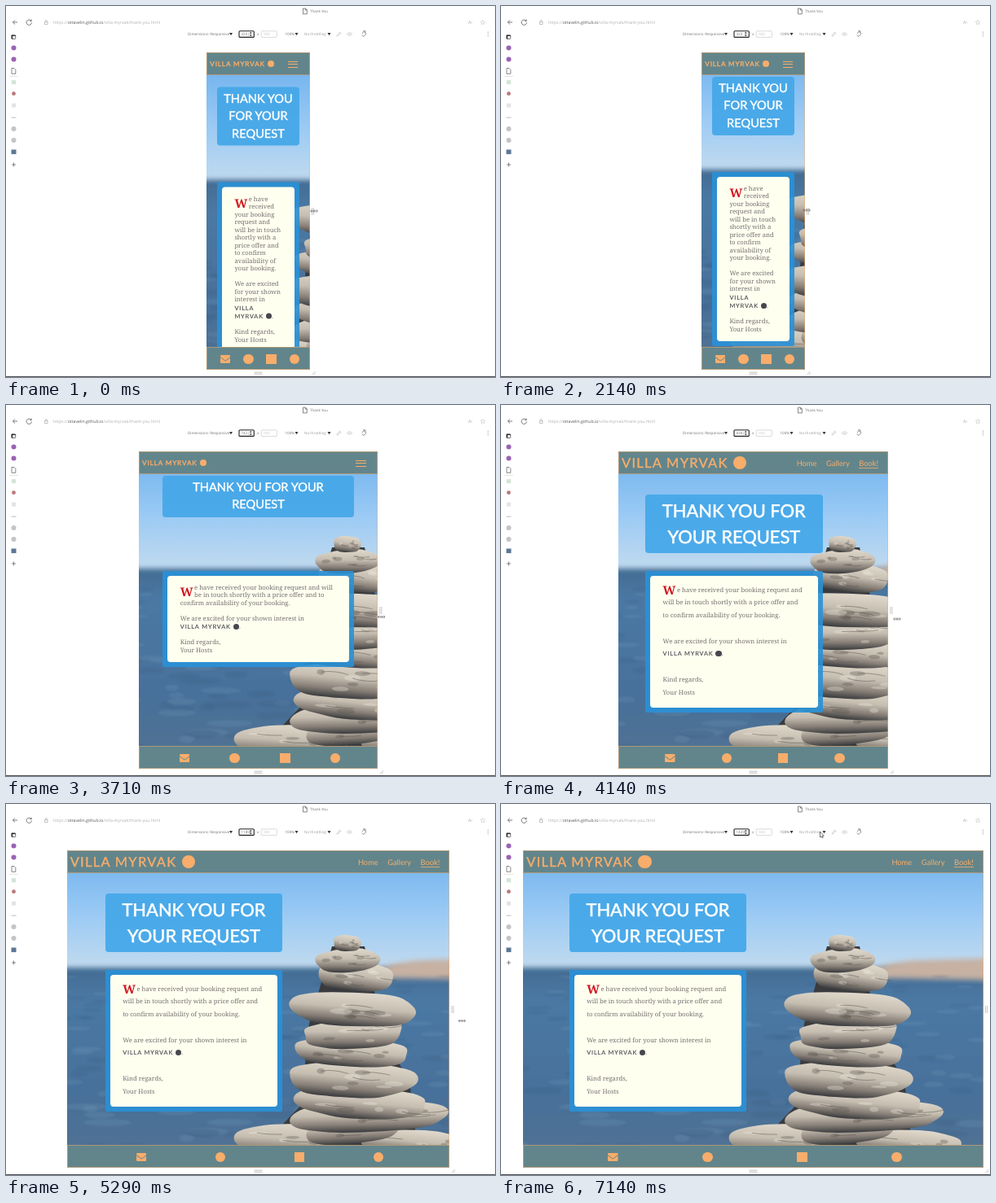
Animation of 600x456 px, one loop 7280 ms. Source, as an HTML page:

```html
<!DOCTYPE html>
<html lang="en">
<head>
<meta charset="utf-8">
<title>Thank You</title>
<style>
html, body { margin: 0; width: 100%; height: 100%; overflow: hidden; background: #fff; }
body { position: relative; text-rendering: geometricPrecision; font-family: Lato, sans-serif; }
svg { display: block; }
#ui, #over { position: absolute; left: 0; top: 0; }
#ui text { font: 4.5px "Open Sans", "Noto Sans", sans-serif; fill: #707070; }
#ui .url { font-size: 5.2px; fill: #b0b0b0; }
#page { position: absolute; top: 57px; height: 390px; overflow: hidden; background: #62858b; --line: rgba(248,173,107,.5); }
header, footer { position: absolute; left: 0; right: 0; height: 28px; color: #f8ad6b; box-shadow: inset 0 0 0 1px var(--line); }
header { top: 0; }
footer { bottom: 0; }
.brand { position: absolute; left: 4px; top: 0; line-height: 29px; font-size: 16.5px; letter-spacing: 1.25px; white-space: nowrap; -webkit-text-stroke: .35px; }
.dot { display: inline-block; width: 1em; height: 1em; border-radius: 50%; background: currentColor; vertical-align: -.13em; }
.brand .dot { margin-left: .05em; }
nav { position: absolute; right: 12px; top: 9px; display: flex; gap: 11.5px; font-size: 9.3px; line-height: 12px; }
nav b { height: 11px; font-weight: 400; border-bottom: 1px solid rgba(248,173,107,.8); }
.menu { position: absolute; right: 14.5px; top: 11px; width: 12.5px; height: 5.5px; border: solid; border-width: 1px 0; display: none; }
.menu::after { content: ""; display: block; margin-top: 2.3px; height: 1px; background: currentColor; }
#view { position: absolute; top: 28px; left: 0; right: 0; height: 334px; overflow: hidden; }
#view::after { content: ""; position: absolute; inset: 0; border-right: 1px solid var(--line); }
#scroll { position: absolute; inset: 0; }
#photo { position: absolute; left: calc(50% - 309.5px); top: -85px; }
h1, .card { position: absolute; left: 10%; width: 217.5px; box-sizing: border-box; margin: 0; border-radius: 4px; }
h1 { top: 24.5px; padding: 4px; font: 400 21.9px/32px Lato, sans-serif; -webkit-text-stroke: .55px; color: #fff; text-align: center; background: rgba(70,168,232,.95); }
.card { top: 119px; padding: 6px; background: rgba(42,146,216,.9); border-radius: 2px; }
.card div { padding: 10.5px 15.5px 9px; border-radius: 4px; background: #fffff0; color: #75706f; font: 7.7px/15.8px "Noto Serif", serif; white-space: nowrap; }
p { margin: 0 0 15.8px; }
p:last-child { margin: 0; }
.cap { float: left; margin-right: 1.5px; font: 700 14.8px/15px "Noto Serif", serif; color: #d3141f; }
.name { font: 7.4px Lato, sans-serif; letter-spacing: .85px; color: #46474c; -webkit-text-stroke: .12px; }
.icons { position: absolute; top: 0; left: calc(10% - 4px); width: calc(80% + 12px); height: 30px; display: flex; justify-content: space-around; align-items: center; }
.icons i { width: 12.5px; height: 12.5px; background: #f8ad6b; border-radius: 50%; }
.icons .sq { border-radius: 0; }
.small .brand { font-size: 8.2px; letter-spacing: .85px; }
.small nav, .small .wide { display: none; }
.small .menu { display: block; }
.small h1 { top: 2px; width: 80%; font-size: 14.6px; line-height: 21.3px; -webkit-text-stroke-width: .4px; }
.small .card { width: 80%; }
.small .card div { line-height: 9.5px; white-space: normal; }
.small p { margin-bottom: 9.5px; }
.small p:last-child { margin: 0; }
.small .cap { margin-top: 2px; }
.small .name { line-height: 9px; }
</style>
</head>
<body>
<svg id="ui" width="600" height="456" fill="none" stroke="#666" stroke-width=".7">
  <path d="M364.5 3h3l1.8 1.8v5h-4.8z M367.3 3v2h2 M7 76.5h3l1.8 1.8v5H7z M9.5 192.5v5M7 195h5" stroke="#555"/>
  <path d="M14 20H8.5m2.5-2.6L8.4 20l2.6 2.6 M30.8 18.2a3.2 3.2 0 1 0 .7 2.2M31.2 16.5v2h-2" stroke="#444"/>
  <path d="M47.5 19.5h3.6v3h-3.6zM48.2 19.5v-1a1.1 1.1 0 0 1 2.2 0v1" stroke="#aaa"/>
  <path d="M585 17.3l.8 1.8 2 .2-1.5 1.3.5 2-1.8-1-1.8 1 .5-2-1.5-1.3 2-.2z" stroke="#ccc"/>
  <path d="M406 37l.5-1.5 3-3 1 1-3 3zM408.8 31.7l2.5 2.5 M418.5 34.5q3-3.5 6 0q-3 3.5-6 0z M420.8 34.5h1.4" stroke="#bbb"/>
  <path d="M437 34l2-2.5 3 2.6-3 3.4-2.4-2 M438 30.8h3v2" stroke="#666"/>
  <rect x="6.7" y="35.7" width="5" height="4.8" rx=".8" stroke="#333"/>
  <path d="M6.7 36.5h5M7.6 35.7v4.8" stroke="#333" stroke-width="1.2"/>
  <g stroke="none">
    <circle cx="9.5" cy="51.5" r="3" fill="#9a62b4"/><circle cx="9.5" cy="65.5" r="3" fill="#9a62b4"/>
    <rect x="6.8" y="91.2" width="5.4" height="5" fill="#d3e5d7"/><circle cx="9.5" cy="107.7" r="2.4" fill="#b9777b"/>
    <rect x="7" y="119.7" width="5" height="5" fill="#e4e4e4"/><path d="M6.5 136.6h6v1h-6z" fill="#bbb"/>
    <circle cx="9.5" cy="151" r="3" fill="#c4c4c4"/><circle cx="9.5" cy="165" r="3" fill="#c4c4c4"/>
    <rect x="6.5" y="176.5" width="6" height="5.6" fill="#5c7896"/>
    <path d="M4 86.3h11v.5H4z" fill="#ccc"/><path d="M0 455h600v1H0z" fill="#555"/>
    <g fill="#333"><path id="tri" d="M274 33h4l-2 3.2z"/><use href="#tri" x="80.5"/><use href="#tri" x="120.5"/>
    <path d="M298.7 33.8h3l-1.5-2zM298.7 35.2h3l-1.5 2z"/></g>
    <g fill="#999"><circle cx="591.5" cy="32.2" r=".6"/><circle cx="591.5" cy="34.5" r=".6"/><circle cx="591.5" cy="36.8" r=".6"/></g>
    <text x="373" y="8.2">Thank You</text>
    <text class="url" x="58" y="21.7">https://<tspan fill="#555">ottavelin.github.io</tspan>/villa-myrvak/thank-you.html</text>
    <text x="567" y="22" style="font-size:5.5px;fill:#aaa">A<tspan dy="-1.5" font-size="3">))</tspan></text>
    <text x="223" y="36.2">Dimensions: Responsive</text>
    <text x="308" y="36">x</text><text x="316" y="36.2" style="fill:#ccc">988</text>
    <text x="342.5" y="36.2">100%</text><text x="366" y="36.2" style="fill:#999">No throttling</text>
    <text id="size" x="288.5" y="36.2"></text>
  </g>
  <rect x="286" y="30.8" width="18.3" height="7.6" rx="1" stroke="#222" stroke-width="1.1"/>
  <rect x="313.3" y="30.8" width="19" height="7.6" rx=".6" stroke="#ccc"/>
  <path d="M304.5 450.3h10M304.5 452.3h10" stroke="#aaa"/>
</svg>

<div id="page">
  <div id="view"><div id="scroll">
    <svg id="photo" width="620" height="440">
      <defs>
        <linearGradient id="sky" x2="0" y2="1"><stop stop-color="#70b2ee"/><stop offset=".5" stop-color="#9acaf4"/><stop offset="1" stop-color="#c6dcee"/></linearGradient>
        <linearGradient id="sea" x2="0" y2="1"><stop stop-color="#426b92"/><stop offset=".15" stop-color="#4b79a4"/><stop offset=".6" stop-color="#47709a"/><stop offset="1" stop-color="#577390"/></linearGradient>
        <linearGradient id="rock" x1=".6" y1="0" x2=".42" y2="1"><stop stop-color="#e0d9cc"/><stop offset=".45" stop-color="#c5bdb0"/><stop offset=".75" stop-color="#877f77"/><stop offset="1" stop-color="#38393c"/></linearGradient>
        <filter id="soft"><feGaussianBlur stdDeviation="3"/></filter>
        <filter id="fine"><feGaussianBlur stdDeviation="1"/></filter>
      </defs>
      <rect y="60" width="620" height="150" fill="url(#sky)"/>
      <rect x="-20" y="201" width="660" height="260" fill="url(#sea)" filter="url(#soft)"/>
      <path d="M440 214Q462 194 515 192T640 189V218Q530 214 440 214z" fill="#c6b1a2" filter="url(#soft)"/>
      <g id="waves" filter="url(#fine)"></g>
      <path d="M400 175H440L465 290 495 340 505 425H310L362 370 372 270z" fill="#3a3b3e"/>
      <g id="stones"></g>
    </svg>
    <h1>THANK YOU FOR YOUR REQUEST</h1>
    <div class="card"><div>
      <p><span class="cap">W</span>e have received your booking request and <br class="wide">will be in touch shortly with a price offer and <br class="wide">to confirm availability of your booking.</p>
      <p>We are excited for your shown interest in<br><span class="name">VILLA MYRVAK <i class="dot"></i></span>.</p>
      <p>Kind regards,<br>Your Hosts</p>
    </div></div>
  </div></div>
  <header>
    <div class="brand">VILLA MYRVAK <i class="dot"></i></div>
    <nav><span>Home</span><span>Gallery</span><b>Book!</b></nav>
    <div class="menu"></div>
  </header>
  <footer><div class="icons">
    <svg width="12.5" height="10" viewBox="0 0 12.5 10"><rect width="12.5" height="10" rx="1.3" fill="#f8ad6b"/><path d="M0 2.6l5.2 3.9q1 .7 2.1 0l5.2-3.9" fill="none" stroke="#62858b"/></svg>
    <i></i><i class="sq"></i><i></i>
  </div></footer>
</div>

<svg id="over" width="600" height="456" fill="none">
  <path id="grip" d="M-1 248v9M1 248v9M-1 453l4-4M1.2 453l1.8-1.8" stroke="#bbb" stroke-width=".8"/>
  <g id="cursor">
    <path id="drag" d="M-4.3 0H-1M1 0h3.3M-2.5-1.8L-4.4 0l1.9 1.8M2.5-1.8L4.4 0 2.5 1.8M-.7-1.5v3M.7-1.5v3" stroke="#666" stroke-width=".7"/>
    <path id="arrow" d="M-1.5-4v7l1.6-1.5 1.1 2.3 1-.5L1.1 1.1h2.2z" fill="#fff" stroke="#222" stroke-width=".6"/>
  </g>
</svg>

<script>
const $ = id => document.getElementById(id);
const CENTER = 309.5, SCALE = .395, LOOP = 7280;

let seed = 11;
const rand = () => (seed = seed * 16807 % 2147483647) / 2147483647;

// Rounded, uneven stone filling the given box, with a few dents and cracks
function stone(x0, y0, x1, y1, tilt) {
  const n = 14, rx = (x1 - x0) / 2, ry = (y1 - y0) / 2, cx = x0 + rx, cy = y0 + ry;
  const soft = v => Math.sign(v) * Math.abs(v) ** .8;
  const pts = Array.from({ length: n }, (_, i) => {
    const a = i / n * 2 * Math.PI, r = .96 + rand() * .16;
    return [cx + rx * r * soft(Math.cos(a)), cy + ry * r * soft(Math.sin(a))];
  });
  const mid = i => pts[i % n].map((v, j) => (v + pts[(i + 1) % n][j]) / 2);
  let d = "M" + mid(n - 1), dents = "", cracks = "";
  pts.forEach((p, i) => d += `Q${p} ${mid(i)}`);
  for (let i = 0; i < 7; i++) {
    const x = cx + (rand() - .5) * rx * 1.4, y = cy + (rand() - .5) * ry * 1.1;
    dents += `<ellipse cx="${x}" cy="${y}" rx="${rx * (.05 + rand() * .14)}" ry="${ry * (.06 + rand() * .12)}" ` +
      `fill="${rand() < .5 ? "#eee8dc" : "#5d5751"}" opacity=".35"/>`;
    if (i < 3) cracks += `M${x} ${y}q${rx * .2} ${ry * (rand() - .3) * .5} ${rx * .45} ${ry * .1}`;
  }
  return `<g transform="rotate(${tilt} ${cx} ${cy})"><path d="${d}z" fill="url(#rock)"/>${dents}` +
    `<path d="${cracks}" fill="none" stroke="#5d5650" stroke-opacity=".5"/></g>`;
}

$("stones").innerHTML = [
  [436, 401, 568, 432, 3], [283, 394, 420, 434, 0], [367, 383, 484, 417, -6],
  [346, 367, 543, 402, -3], [358, 349, 515, 386, 3], [349, 317, 501, 360, 2],
  [356, 288, 493, 322, 3], [366, 265, 487, 300, -3], [351, 231, 499, 273, 2],
  [386, 194, 475, 231, 4], [381, 178, 457, 206, -3], [402, 161, 435, 181, 2]
].map(s => stone(...s)).join("");

$("waves").innerHTML = Array.from({ length: 150 }, () => {
  const y = 210 + rand() * 215, size = (y - 190) / 12;
  return `<ellipse cx="${rand() * 620}" cy="${y}" rx="${8 + size * 1.6 * rand()}" ry="${1 + size * .2}" ` +
    `fill="${rand() < .5 ? "#7d9fbe" : "#33587c"}" opacity=".2"/>`;
}).join("");

// Piecewise linear lookup in rows of [step, value]
function at(keys, k) {
  const i = keys.findIndex(p => p[0] > k);
  if (i === 0) return keys[0][1];
  if (i < 0) return keys[keys.length - 1][1];
  const [a, u] = keys[i - 1], [b, v] = keys[i];
  return u + (v - u) * (k - a) / (b - a);
}
const width = [[18, 126.5], [22, 228.5], [26, 293], [29, 331], [33, 411], [34, 422], [41, 533], [42, 564.5]];
const mouseX = [[9, 378], [15, 375], [18, 375], [22, 427], [29, 486], [33, 521], [41, 598], [45, 598], [50, 393]];
const mouseY = [[9, 252], [15, 251], [18, 251], [22, 257], [29, 263], [33, 265], [41, 268], [45, 268], [50, 38]];
const scroll = [[9, 12.5], [15, 0]];

function draw(time) {
  const k = Math.floor((time % LOOP + 6) * .007);   // seven updates a second
  const w = at(width, k), pointing = k > 45;
  const page = $("page");
  page.style.left = CENTER - w / 2 + "px";
  page.style.width = w + "px";
  page.className = w / SCALE < 768 ? "small" : "";
  $("scroll").style.transform = `translateY(${at(scroll, k)}px)`;
  const caret = k < 10 || k > 18 && !pointing;
  $("size").textContent = Math.round(w / SCALE) + (caret ? "|" : "");
  $("grip").setAttribute("transform", `translate(${CENTER + w / 2 + 3.8})`);
  $("cursor").setAttribute("transform", `translate(${at(mouseX, k)} ${at(mouseY, k)})`);
  $("drag").style.display = pointing ? "none" : "";
  $("arrow").style.display = pointing ? "" : "none";
  requestAnimationFrame(tick);
}
let start;
function tick(now) {
  start ??= now;
  draw(now - start);
}
draw(0);
</script>
</body>
</html>
```
